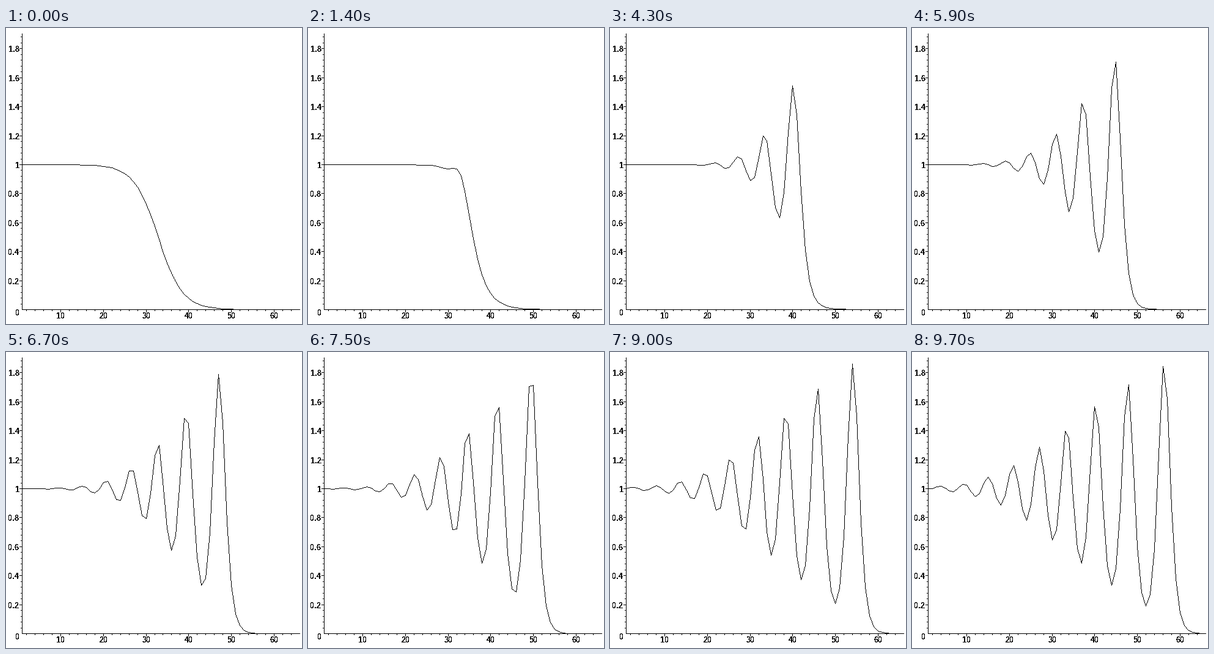
A matplotlib script for the animation above (9.8 s loop, 484 by 484 pixels).

```python
import numpy as np
import matplotlib.pyplot as plt
from matplotlib.animation import FuncAnimation

# Crisp, fully hinted labels without smoothing
plt.rcParams["text.hinting"] = "native"
plt.rcParams["text.hinting_factor"] = 1

SIZE, DPI = 484, 64
FRAMES, INTERVAL = 98, 100

POINTS = 66
CENTRE, STEEPNESS = 32.85, 0.345    # initial smooth step
ADVECTION, DISPERSION = 0.498, 0.247

LEFT, RIGHT, TOP, BASE = 26, 480, 9, 460
X_UNIT, Y_UNIT = (RIGHT - LEFT) / (POINTS - 1), 237


def col(x):
    return np.rint(LEFT + (np.asarray(x) - 1) * X_UNIT).astype(int)


def row(y):
    return np.rint(BASE - np.asarray(y) * Y_UNIT).astype(int)


def slope(u):
    """Change per time step of the Korteweg-de Vries equation."""
    p = np.concatenate(([1.0], u, [0.0]))
    a, b, d, e = p[:-4], p[1:-3], p[3:-1], p[4:]
    change = np.zeros_like(u)
    change[1:-1] = (-ADVECTION / 4 * (d * d - b * b)
                    - DISPERSION / 2 * (e - 2 * d + 2 * b - a))
    return change


def solve():
    """Leapfrog in time, started with one forward step."""
    i = np.arange(1, POINTS + 1)
    u = 1 / (1 + np.exp(STEEPNESS * (i - CENTRE)))
    states = [u, u + slope(u)]
    while len(states) < FRAMES:
        states.append(states[-2] + 2 * slope(states[-1]))
    return states


def stroke(canvas, xs, ys):
    """Draw a one-pixel polyline without smoothing."""
    for x0, y0, x1, y1 in zip(xs[:-1], ys[:-1], xs[1:], ys[1:]):
        steps = max(abs(x1 - x0), abs(y1 - y0)) + 1
        x = np.rint(np.linspace(x0, x1, steps)).astype(int)
        y = np.rint(np.linspace(y0, y1, steps)).astype(int)
        canvas[np.clip(y, 0, SIZE - 1), x] = 0


fig = plt.figure(figsize=(SIZE / DPI, SIZE / DPI), dpi=DPI, facecolor="white")
ax = fig.add_axes([0, 0, 1, 1])
ax.axis("off")


def label(x, baseline, text, ha):
    ax.text(x, baseline, text, ha=ha, va="baseline", fontsize=13 * 72 / DPI,
            family="Liberation Sans", weight="bold", antialiased=False)


def draw_axes():
    canvas = np.ones((SIZE, SIZE))
    stroke(canvas, [LEFT, LEFT, RIGHT], [TOP, BASE, BASE])
    for n in range(1, 48):
        y, major = row(n * 0.04), n % 5 == 0
        stroke(canvas, [LEFT - (4 if major else 2), LEFT], [y, y])
        if major:
            label(22, y + 6, f"{n * 0.04:.2g}", "right")
    for n in range(2, POINTS, 2):
        x, major = col(n), n % 10 == 0
        stroke(canvas, [x, x], [BASE, BASE + (4 if major else 2)])
        if major:
            label(x + 0.5, 475, str(n), "center")
    label(22, 470, "0", "right")
    return canvas


backdrop = draw_axes()
states = solve()
columns = col(np.arange(1, POINTS + 1))
picture = ax.imshow(backdrop, cmap="gray", vmin=0, vmax=1, aspect="auto",
                    interpolation="nearest", extent=(0, SIZE, SIZE, 0))


def update(frame):
    canvas = backdrop.copy()
    stroke(canvas, columns, row(states[frame]))
    picture.set_data(canvas)
    return (picture,)


anim = FuncAnimation(fig, update, frames=FRAMES, interval=INTERVAL,
                     repeat=True, repeat_delay=0, blit=False)
plt.show()
```
